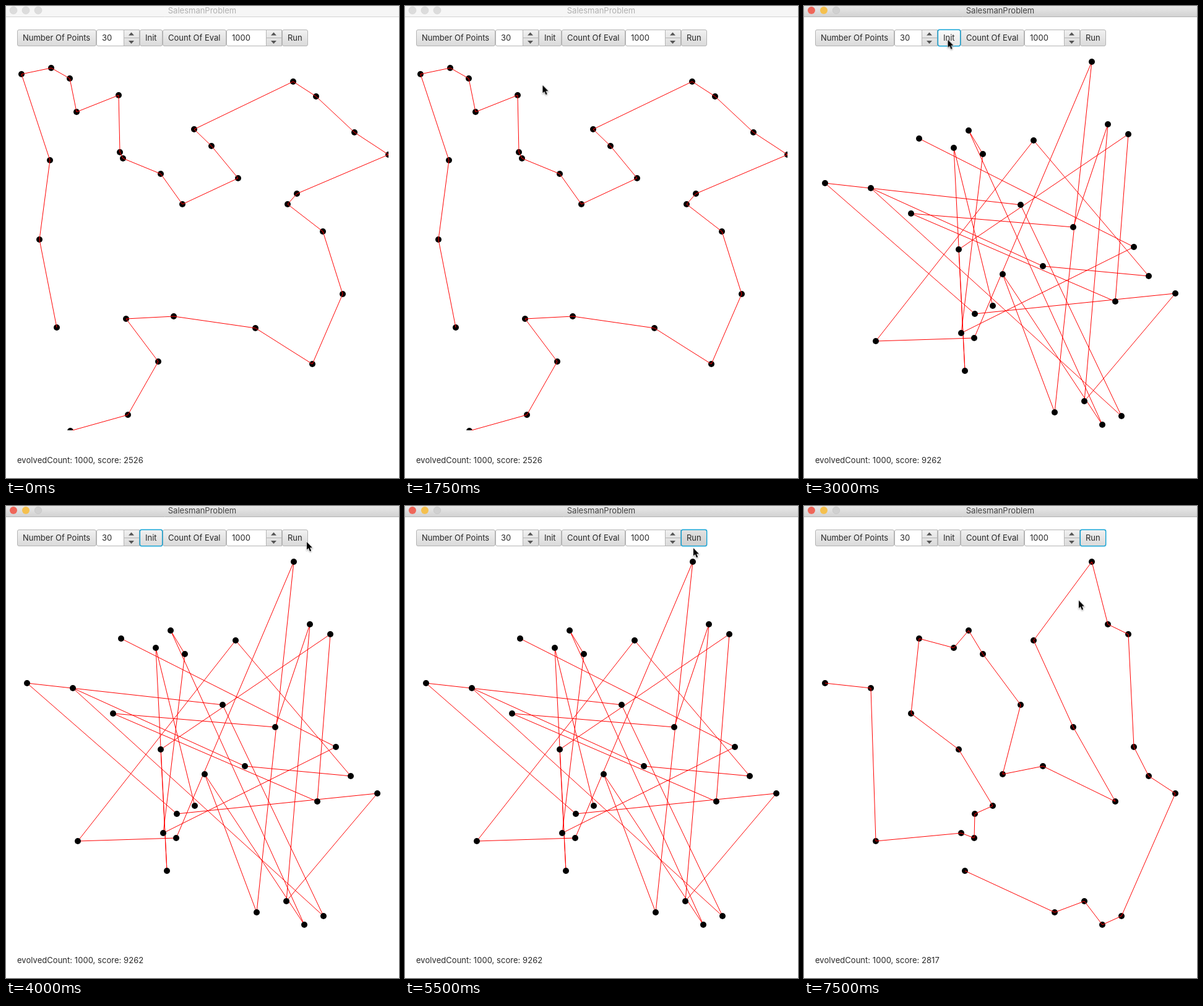
Recreate the animation shown at these times as an HTML page. Size 635 by 762 pixels, loop 8 s.

```html
<!DOCTYPE html>
<html lang="en">
<head>
<meta charset="utf-8">
<title>SalesmanProblem</title>
<style>
  html, body { margin: 0; width: 100%; height: 100%; overflow: hidden; background: #fff; }
  svg { display: block; width: 635px; height: 762px; }
  text { font: 13px Inter, "Open Sans", sans-serif; fill: #282828; white-space: pre; }
  .title { text-anchor: middle; }
  .status { letter-spacing: .04px; }
  .route { fill: none; stroke: #f00; marker: url(#dot); }
  .under { paint-order: markers stroke; }

  .step { animation: 8s step-end infinite; }
  .before { animation-name: before; }
  .after { animation-name: after; }
  .shuffled { animation-name: shuffled; }
  .solved { animation-name: solved; }
  .init-hover { animation-name: init-hover; }
  .init-focus { animation-name: init-focus; }
  .run-hover { animation-name: run-hover; }
  .run-press { animation-name: run-press; }
  .run-focus { animation-name: run-focus; }
  .cursor { animation-name: cursor; filter: drop-shadow(0 1px 1px rgba(0, 0, 0, .35)); }

  @keyframes before { 0% { opacity: 1 } 37.5% { opacity: 0 } }
  @keyframes after { 0% { opacity: 0 } 37.5% { opacity: 1 } }
  @keyframes shuffled { 0% { opacity: 0 } 37.5% { opacity: 1 } 93.75% { opacity: 0 } }
  @keyframes solved { 0% { opacity: 0 } 93.75% { opacity: 1 } }
  @keyframes init-hover { 0% { opacity: 0 } 28.125% { opacity: 1 } 46.875% { opacity: 0 } }
  @keyframes init-focus { 0% { opacity: 0 } 37.5% { opacity: 1 } 56.25% { opacity: 0 } }
  @keyframes run-hover { 0% { opacity: 0 } 53.125% { opacity: 1 } 56.25% { opacity: 0 } }
  @keyframes run-press { 0% { opacity: 0 } 56.25% { opacity: 1 } 93.75% { opacity: 0 } }
  @keyframes run-focus { 0% { opacity: 0 } 56.25% { opacity: 1 } }
  @keyframes cursor {
    0% { transform: translate(-30px, 0) }
    9.375% { transform: translate(424px, 19px) }
    12.5% { transform: translate(423px, 27px) }
    21.875% { transform: translate(222.5px, 128px) }
    25% { transform: translate(223px, 98px) }
    28.125% { transform: translate(232.5px, 54.5px) }
    46.875% { transform: translate(378px, 67px) }
    50% { transform: translate(486px, 58px) }
    53.125% { transform: translate(468.5px, 54.5px) }
    68.75% { transform: translate(466px, 68px) }
    71.875%, 100% { transform: translate(444px, 152.5px) }
  }
</style>
</head>
<body>
<svg viewBox="0 0 635 762">
  <defs>
    <linearGradient id="bar" x2="0" y2="1"><stop stop-color="#e9e9e9"/><stop offset="1" stop-color="#d2d2d2"/></linearGradient>
    <linearGradient id="face" x2="0" y2="1"><stop stop-color="#f1f1f1"/><stop offset="1" stop-color="#dadada"/></linearGradient>
    <linearGradient id="hover" x2="0" y2="1"><stop stop-color="#fbfbfb"/><stop offset="1" stop-color="#e8e8e8"/></linearGradient>
    <linearGradient id="press" x2="0" y2="1"><stop stop-color="#e2e2e2"/><stop offset="1" stop-color="#cdcdcd"/></linearGradient>
    <clipPath id="board"><path d="M18 85h600v600H18z"/></clipPath>
    <marker id="dot" markerUnits="userSpaceOnUse" markerWidth="10" markerHeight="10" refX="5" refY="5">
      <circle cx="5" cy="5" r="5"/>
    </marker>
  </defs>

  <g class="step before">
    <path d="M0 0h635v17H0z" fill="#f6f6f6"/>
    <path d="M0 17.5h635" stroke="#d3d3d3"/>
    <g fill="#dcdcdc" stroke="#d0d0d0" stroke-width=".6">
      <circle cx="12" cy="7" r="6"/><circle cx="32" cy="7" r="6"/><circle cx="52" cy="7" r="6"/>
    </g>
    <text class="title" x="317" y="12" style="fill:#b0b0b0">SalesmanProblem</text>
  </g>
  <g class="step after">
    <path d="M0 0h635v17H0z" fill="url(#bar)"/>
    <path d="M0 17.5h635" stroke="#b4b4b4"/>
    <circle cx="12" cy="7" r="6" fill="#ef6659"/>
    <circle cx="32" cy="7" r="6" fill="#f5c04e"/>
    <circle cx="52" cy="7" r="5.7" fill="#d0d0d0" stroke="#c0c0c0" stroke-width=".6"/>
    <text class="title" x="317" y="12" style="fill:#444">SalesmanProblem</text>
  </g>

  <g id="controls"></g>

  <g clip-path="url(#board)">
    <polyline class="route under step before" points="82,519 54,377 71,249 25,110 73,100 103,117 114,171
      182,144 184,236 189,246 250,271 285,320 375,278 332,226 304,199 464,122 501,146 563,204 618,240
      470,303 455,320 512,364 544,465 495,578 403,520 271,501 194,505 246,574 197,660 104,686"/>
    <polyline id="random" class="route step shuffled" points="186,214 533,389 254,528 289,239 266,201 482,676
      321,433 405,656 465,90 275,536 116,541 371,217 557,436 386,420 108,294 513,662 350,321 34,286 276,497
      600,464 453,638 491,191 435,357 173,335 503,477 524,207 250,393 260,589 242,229 305,484"/>
    <polyline id="best" class="route under step solved"/>
  </g>

  <text class="status step before" x="18" y="738">evolvedCount: 1000, score: 2526</text>
  <text class="status step shuffled" x="18" y="738">evolvedCount: 1000, score: 9262</text>
  <text class="status step solved" x="18" y="738">evolvedCount: 1000, score: 2817</text>

  <path class="step cursor" d="M0 0V12.6L2.9 9.9 5 15.2 7.2 14.3 5 9.2H9Z" stroke="#fff" stroke-width="1.4" paint-order="stroke"/>
</svg>
<script>
  const find = id => document.getElementById(id);

  const box = (x, w, fill, cls = '') =>
    `<rect class="${cls}" x="${x + .5}" y="38.5" width="${w - 1}" height="26" rx="2.5" fill="${fill}" stroke="#b4b4b4"/>`;

  // states: pairs of [gradient, class]
  function button(x, w, label, states = []) {
    return box(x, w, 'url(#face)') +
      states.map(([fill, cls]) => box(x, w, `url(#${fill})`, 'step ' + cls)).join('') +
      `<text x="${x + 9}" y="56">${label}</text>`;
  }

  function spinner(x, w, value) {
    const split = x + w - 26, mid = x + w - 13.5;
    return box(x, w, '#fff') +
      `<path d="M${split + .5} 38.5H${x + w - .5}V64.5H${split + .5}zM${split} 51.5h26" fill="url(#face)" stroke="#b4b4b4"/>
       <path d="M${mid - 4.5} 47.5h9l-4.5 -5zM${mid - 4.5} 56h9l-4.5 5z" fill="#555"/>
       <text x="${x + 9}" y="56">${value}</text>`;
  }

  const focus = (x, w, cls) => `<g class="step ${cls}" fill="none" stroke="#039ed3">
    <rect x="${x - .7}" y="37.3" width="${w + 1.4}" height="28.4" rx="3.5" stroke-opacity=".13" stroke-width="1.4"/>
    <rect x="${x + .4}" y="38.4" width="${w - .8}" height="26.2" rx="2.5" stroke-width="1.2"/></g>`;

  find('controls').innerHTML =
    button(18, 128, 'Number Of Points') +
    spinner(146, 70, 30) +
    button(216, 37, 'Init', [['hover', 'init-hover']]) +
    button(253, 103, 'Count Of Eval') +
    spinner(356, 90, 1000) +
    button(446, 42, 'Run', [['hover', 'run-hover'], ['press', 'run-press']]) +
    focus(216, 37, 'init-focus') +
    focus(446, 42, 'run-focus');

  const dist = (a, b) => Math.hypot(a.x - b.x, a.y - b.y);

  // Cheapest insertion: grow a rough route by the smallest detour each time.
  function solve(cities, rough) {
    const tour = rough.map(i => cities[i]);
    const rest = new Set(cities.filter(c => !tour.includes(c)));
    while (rest.size) {
      let best = { cost: Infinity };
      for (const city of rest) {
        for (let i = 1; i < tour.length; i++) {
          const [a, b] = [tour[i - 1], tour[i]];
          const cost = dist(a, city) + dist(city, b) - dist(a, b);
          if (cost < best.cost) best = { cost, city, i };
        }
      }
      tour.splice(best.i, 0, best.city);
      rest.delete(best.city);
    }
    return tour;
  }

  const cities = Array.from(find('random').points, ({ x, y }) => ({ x, y }));
  const tour = solve(cities, [17, 10, 29, 0, 6, 24, 22, 8, 19, 15, 27]);
  find('best').setAttribute('points', tour.map(c => `${c.x},${c.y}`).join(' '));
</script>
</body>
</html>
```
